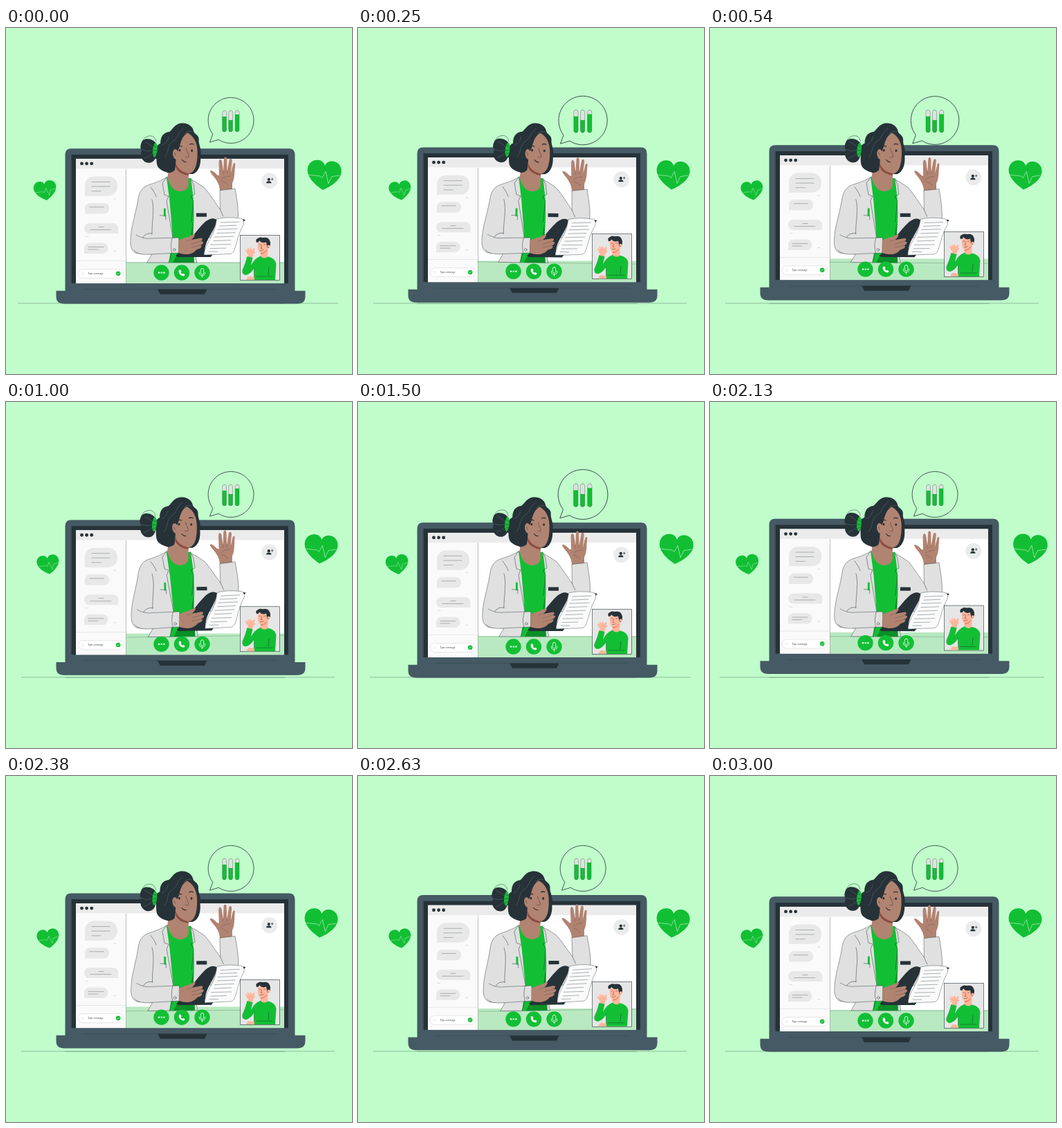
An HTML page that plays this animation: 500x500 px, repeating every 3.04 s.

```html
<!DOCTYPE html>
<html lang="en">
<head>
<meta charset="utf-8">
<title>Online consultation</title>
<style>
  html, body { margin: 0; width: 100%; height: 100%; overflow: hidden; background: #c0fdcb; }
  svg { display: block; width: 100vw; height: 100vh; }
  .dark { fill: #263238; }
  .green { fill: #12bf34; }
  .steel { fill: #455a64; }
  .grey { fill: #ebebeb; }
  .coat { fill: #e0e0e0; stroke: #263238; stroke-width: .45; stroke-linejoin: round; }
  .skin { fill: #b18371; }
  .pale { fill: #ffb69c; }
  .thin { fill: none; stroke: #263238; stroke-width: .5; stroke-linecap: round; stroke-linejoin: round; }
  .white { fill: none; stroke: #fff; stroke-linecap: round; stroke-linejoin: round; }
  text { font: 3.2px Lato, Arial, sans-serif; fill: #37474f; }
</style>
</head>
<body>
<svg viewBox="0 0 500 500">
  <defs>
    <g id="heart">
      <path class="green" d="M0 .5C-.2 .38-.5 .13-.5-.16C-.5-.38-.36-.5-.22-.5C-.1-.5-.03-.43 0-.33C.03-.43 .1-.5 .22-.5C.36-.5 .5-.38 .5-.16C.5 .13 .2 .38 0 .5Z"/>
      <path class="white" stroke-width=".015" opacity=".7" d="M-.45 .03L-.12 .04L-.05 .09L.04-.13L.15 .27L.23 .02L.46-.04"/>
    </g>
  </defs>

  <path id="floor" d="M22 397.8H475" stroke="#263238" stroke-opacity=".4" stroke-width=".8"/>
  <path d="M85 398.2H403" stroke="#263238" stroke-opacity=".25" stroke-width="1"/>
  <use id="heartL" href="#heart"/>
  <use id="heartR" href="#heart"/>

  <g id="laptop">
    <path class="steel" d="M85.500 381V183Q85.500 174.300 94 174.300H409Q417.500 174.300 417.500 183V381Z"/>
    <rect class="dark" x="94.500" y="183" width="313.500" height="186"/>
    <rect x="101" y="189" width="301" height="180" fill="#fff"/>
    <rect x="101" y="203" width="72.500" height="166" fill="#fafafa"/>
    <rect class="grey" x="101" y="189" width="301" height="14.300"/>
    <g class="dark"><circle cx="109.500" cy="196" r="2.400"/><circle cx="116.600" cy="196" r="2.400"/><circle cx="123.700" cy="196" r="2.400"/></g>
    <rect x="173.500" y="338.300" width="228.500" height="30.700" fill="#b8e9c0"/>
    <path class="thin" opacity=".6" d="M173.500 204V369"/>
    <path class="thin" opacity=".2" d="M101 336.500H173.500"/>
    <g fill="#e8e8e8">
      <path d="M114 242.700V227.500A13 13 0 0 1 127 214.500H148A13 13 0 0 1 161 227.500V230A13 13 0 0 1 148 242.700Z"/>
      <path d="M114 268.500V260.500A7.500 7.500 0 0 1 121.500 253H141.500A7.700 7.700 0 0 1 141.500 268.500Z"/>
      <path d="M162.300 297V289.500A7.500 7.500 0 0 0 154.800 282H120.500A7.500 7.500 0 0 0 120.500 297Z"/>
      <path d="M113 326V318A7.500 7.500 0 0 1 120.500 310.500H139.700A7.700 7.700 0 0 1 139.700 326Z"/>
    </g>
    <path class="thin" opacity=".65" d="M124 222.500H150M124 229H150M124 235.700H137M121 258.700H141M134 287.500H141M122 291.500H152M119 316.500H141M119 320H133"/>
    <path class="thin" opacity=".3" d="M155.500 247H159M115 301.500H119M155.500 322.500H159"/>
    <rect x="104.500" y="348.500" width="65.500" height="13" rx="6.500" fill="#fff" stroke="#d9d9d9" stroke-width=".6"/>
    <circle cx="110.500" cy="355" r="1.700" fill="none" stroke="#d9d9d9" stroke-width=".5"/>
    <text x="118.500" y="356.100">Type a message</text>
    <circle class="green" cx="162.200" cy="354.800" r="3.300"/>
    <path class="white" stroke-width=".6" d="M160.700 355L161.700 356L163.800 353.600"/>

    <circle cx="380.800" cy="220.700" r="11.500" fill="#ebebeb"/>
    <g class="dark"><circle cx="379.800" cy="218.900" r="2.100"/><path d="M376.200 224.200Q376 221.200 379.800 221.200T383.500 224.200Z"/></g>
    <path d="M384.700 216.500V220.500M382.900 218.500H386.500" stroke="#263238" stroke-width=".7"/>

    <path class="steel" d="M72.500 379.700H432.500V388Q432.500 398.500 421 398.500H84Q72.500 398.500 72.500 388Z"/>
    <path class="thin" opacity=".45" d="M111 377.600H392"/>
    <path class="dark" d="M219 377.500H290.500L287 384.700H223Z"/>
  </g>

  <g id="doctor">
    <path class="thin" opacity=".45" d="M174 339H402"/>
    <!-- raised hand -->
    <path class="skin" d="M309 237C309 229 307 224 302 217C299 213 295 209 295 206.500C297 204.500 302 209 306 213L308 213L307.500 195C307.500 189 311 188.500 312 193L314 207L315 189C315 185.500 319 185.500 319 189L319.500 207L322.500 191C323 187.500 327 188 326.500 192L325 209L328 197C329 193.500 332 194.500 331 198C330 208 331 216 327 224L327 237Z"/>
    <path class="thin" opacity=".5" d="M311 219Q315 214 324 214M312 221Q317 222 321 227M314 207V211M319.500 207V210"/>
    <!-- coat -->
    <path class="coat" d="M233 215C226 220 218 223 207 226.500C196 230 192 238 190.500 250C187 271 181 286 180 307C179.500 318 183 325 191 326L211 327L204 339H276L271 309C290 303 323 298 333 283Q339 275 331 232L309 234.500L309.500 262C302 252 295 240 287 231Q278 224 266 218Z"/>
    <path class="green" d="M232 216L236.500 250L241 302L235.500 339H272L270 300C273.500 274 271 240 267 217Z"/>
    <path fill="#0b8f27" d="M270 280L272 339H241L247 328H260L267 302Z"/>
    <path class="thin" d="M232 216L226 224L229 241L235 243L232 250L241 302M267 217L271 226L273 240L267 243L271 250L268 280M211 248C215 262 211 278 211 298M309.500 262L314 272M241 320L235.500 339M209 230Q216 239 217 244"/>
    <rect class="green" x="228" y="260.500" width="2.900" height="12" rx="1.200"/>
    <path class="thin" d="M222.500 271H228M231 271V277"/>
    <rect class="dark" x="275" y="267.500" width="15" height="5.200"/>
    <!-- clipboard -->
    <path class="dark" d="M245.500 329C259 317 274 293 288 280Q298 272 304.500 277C303 291 292 301 288 316L286.500 327H299L296 331H248Z"/>
    <path d="M304.500 276Q319 272 340 275Q345 277 343.500 284C336 296 334 310 330 321Q328 327 321 326.500L286.500 328C287 312 300 301 303 285Q304 279 304.500 276Z" fill="#fafafa" stroke="#263238" stroke-width=".4"/>
    <path class="dark" d="M342 276L346 276.800L344 279.500Z"/>
    <path class="thin" opacity=".75" d="M310 281L337 280M309 286L333 285M306 291L334 290M305 296.500L331 295.500M301 302L329 301M300 307.500L325 306.500M296 313L325 312.500M295 318.500L318 318M293 323H306"/>
    <path class="coat" d="M188 299Q200 306 211 304L250 303L249.500 325L211 327Q190 329 185 321"/>
    <path class="thin" d="M240.500 303Q237 314 240 325.500M211 297Q201 296 198 303"/>
    <circle class="thin" cx="243.500" cy="320.500" r="1.800"/>
    <path class="skin" d="M249.500 307Q257 303 263 302L271 298Q275 298 271 303L268 306L282 303.500Q286 305 282 308L285 309Q286 312 281 314L283 315Q282 319 276 320C270 327 262 329 249.500 325Z"/>
    <path class="thin" opacity=".5" d="M282 308L268 312M281 314L268 317M268 306L261 308"/>
    <!-- hair and face -->
    <path class="dark" d="M218 169C214 159 198 157 195.500 166C193.500 171 194 174 196 177C193 184 196 191 202 194C210 197 216 192 217 183Z"/>
    <path class="thin" d="M197 164Q199 157 207 156T217 164"/>
    <path class="thin" style="stroke:#60717a" d="M196 176Q205 180 214 176M201 165Q209 168 214 174M200 188Q208 186 214 179"/>
    <path class="skin" d="M235 205L264 205L263.500 218C266 230 261 236 251 236C242 236 235 226 233.500 215Z"/>
    <path class="dark" d="M217 181C216 173 219 168 223 167C223 157 227 151 236 150C240 147 242 142 248 139C257 135 269 139 271 149C272 154 280 154 278.500 164C279 170 283 176 281 185C282 196 279 208 270 211L262 211L246 202Q244 208 235 209.500C231 208 226 207 221.500 203C216 198 218 190 217 181Z"/>
    <ellipse class="green" cx="215.300" cy="176.300" rx="3.300" ry="10.500" transform="rotate(5 215 176)"/>
    <path class="thin" d="M213 170L217 172M212.500 177H218M213 183L217 181"/>
    <path class="skin" d="M262 151.500C270 155 276 164 276.500 177C277 195 274 209 264 210.500L263.500 218H240Q245 207 245.500 190C241 188 239 179 243 175.500Q246 174 248 178C253 169 251 159 262 151.500Z"/>
    <path fill="#8d4d3f" d="M245.500 196Q249 207 264 210.500L263.800 213Q249 211 245 201Z"/>
    <path class="thin" style="stroke:#60717a" d="M256 145C246 154 248 160 241 164C232 169 236 180 229 187M269 150Q262 148 258 153M226 169Q233 166 235 157"/>
    <ellipse class="dark" cx="250.800" cy="176.700" rx="1.500" ry="1.800"/>
    <ellipse class="dark" cx="268.500" cy="177.200" rx="1.500" ry="1.800"/>
    <path class="thin" style="stroke-width:1.300" d="M247 171.500Q250 169.500 254 171M265.500 168Q268 166.500 271 168"/>
    <path class="thin" d="M260.500 174C261 180 265 183 264 186Q262 188 259.500 186.500M243 180Q244.500 180 244.800 184"/>
    <path class="thin" style="stroke-width:1.100" d="M254.500 190.500Q257 194.500 260.500 193.500"/>
  </g>

  <g id="controls">
    <g class="green"><circle cx="224.500" cy="353.600" r="11.200"/><circle cx="254" cy="353.600" r="11.200"/><circle cx="283.500" cy="353.600" r="11.200"/></g>
    <g fill="#fff"><circle cx="221" cy="353.600" r="1.200"/><circle cx="224.700" cy="353.600" r="1.200"/><circle cx="228.400" cy="353.600" r="1.200"/></g>
    <path fill="#fff" d="M249.700 350.500Q251 348.500 252.500 350L253.500 352L252.700 353.300Q253.500 355 255.300 355.600L256.500 354.800L258.300 356.200Q258.800 357.500 257 358.500C252.500 358.500 249 354.500 249.700 350.500Z"/>
    <g class="white" stroke-width=".8"><rect x="281.300" y="347.500" width="4.400" height="8.600" rx="2.200"/><path d="M279.300 353Q279 358 283.500 358T287.700 353M283.500 358V360.300"/></g>

    <rect x="338.500" y="299.500" width="57" height="65" fill="#e6e6e6" stroke="#263238" stroke-width=".6"/>
    <path class="pale" d="M349 333L350 328Q346 323 346 320Q348 320 350 322L348.500 318Q350 316.500 352 321L352.500 317.500Q354.500 316.500 355 321L358.500 318Q361 319 358 323L360 323Q360.500 325 357 328L356 334Z"/>
    <path class="green" d="M348.500 330Q346 340 341.500 350Q340.500 357 347 357Q354 355 358.500 347L359 364H389L390.500 341Q389.500 333 379 330.500L368 329.500Q359 333 354 343L356.500 332Z"/>
    <path class="pale" d="M347.500 364Q348 358.500 353 359L359 360V364Z"/>
    <path class="pale" d="M364 310L378 307L382 312Q381.500 316 379 318L378 331Q372 334.500 367.500 329.500V325Q363 323 364 310Z"/>
    <path fill="#e98766" d="M368 325Q373 325.500 377 320L376.800 322Q373 327 368 327Z"/>
    <path class="dark" d="M362 310Q360 305 364 304Q366 301.500 371 303Q379 301.500 381 307Q383.500 312 380 318L377.500 317L376 309.500Q370 312 366 307Q366 310 362 310Z"/>
    <circle class="pale" cx="379.500" cy="315.500" r="1.900"/>
    <path class="thin" d="M366 313H368M372.500 313H374.500M369.500 314L368.500 318.500H370M367.500 321.500Q370 322.500 372 320.500M358.500 347V360M380 346L379 357M362 359H385"/>
  </g>

  <g id="bubble">
    <path class="thin" style="stroke-width:.8" d="M298.600 153.300A33 33 0 1 1 307.200 161.300L294.800 165Z"/>
    <g id="tubes"></g>
  </g>
</svg>
<script>
  const LOOP = 3040, CYCLE = 1500, LEAD = 40;
  const el = id => document.getElementById(id);
  const set = (id, transform) => el(id).setAttribute('transform', transform);
  const scaleAt = (x, y, sx, sy = sx) => `translate(${x} ${y}) scale(${sx} ${sy}) translate(${-x} ${-y})`;

  // Tube: left edge, top of the liquid
  el('tubes').innerHTML = [[312.7, 128], [321.7, 133], [331.2, 125]].map(([x, top]) => `
    <rect x="${x}" y="119.300" width="5.800" height="30.700" rx="2.900" fill="#e0e0e0"/>
    <path class="green" d="M${x} ${top}h5.800V147.100a2.900 2.900 0 0 1-5.800 0Z"/>
    <rect class="thin" x="${x}" y="119.300" width="5.800" height="30.700" rx="2.900" opacity=".6"/>`).join('');

  const PEAKS = [130, 732, 1630, 2232], RISE = 176, FALL = 90;
  const beat = t => Math.max(0, ...PEAKS.map(p => 1 - (t < p ? (p - t) / RISE : (t - p) / FALL)));

  const PULSES = [0, 1140], PULSE = 760;
  const pulse = t => {
    const u = PULSES.map(s => (t - s) / PULSE).find(v => v >= 0 && v < 1);
    return u === undefined ? 0 : Math.sin(Math.PI * u) ** 2;
  };

  // Triangle wave: 0, 1, 0, -1 over one cycle
  const sway = u => u < .25 ? 4 * u : u < .75 ? 2 - 4 * u : 4 * u - 4;

  function draw(t) {
    const u = (t + LEAD) % CYCLE / CYCLE;
    const lift = -2.8 * (1 - Math.cos(2 * Math.PI * u));
    set('laptop', `translate(0 ${lift})`);
    set('controls', `translate(0 ${lift})`);
    set('doctor', `rotate(${sway(u)} 250 235)`);
    set('bubble', scaleAt(325, 133, 1 + .09 * pulse(t)));

    const s = 1 + .084 * beat(t), mid = 248.5;
    const heart = (id, x, y, w, h, turn) =>
      set(id, `translate(${mid + (x - mid) * s} ${y}) rotate(${turn}) scale(${w * s} ${h * s})`);
    set('floor', scaleAt(mid, 398, s, 1));
    heart('heartL', 61, 235, 32, 27.5, -8);
    heart('heartR', 455, 212.8, 48, 41.5, 5);
  }

  const start = performance.now();
  function tick() {
    draw((performance.now() - start) % LOOP);
    requestAnimationFrame(tick);
  }
  tick();
</script>
</body>
</html>
```
